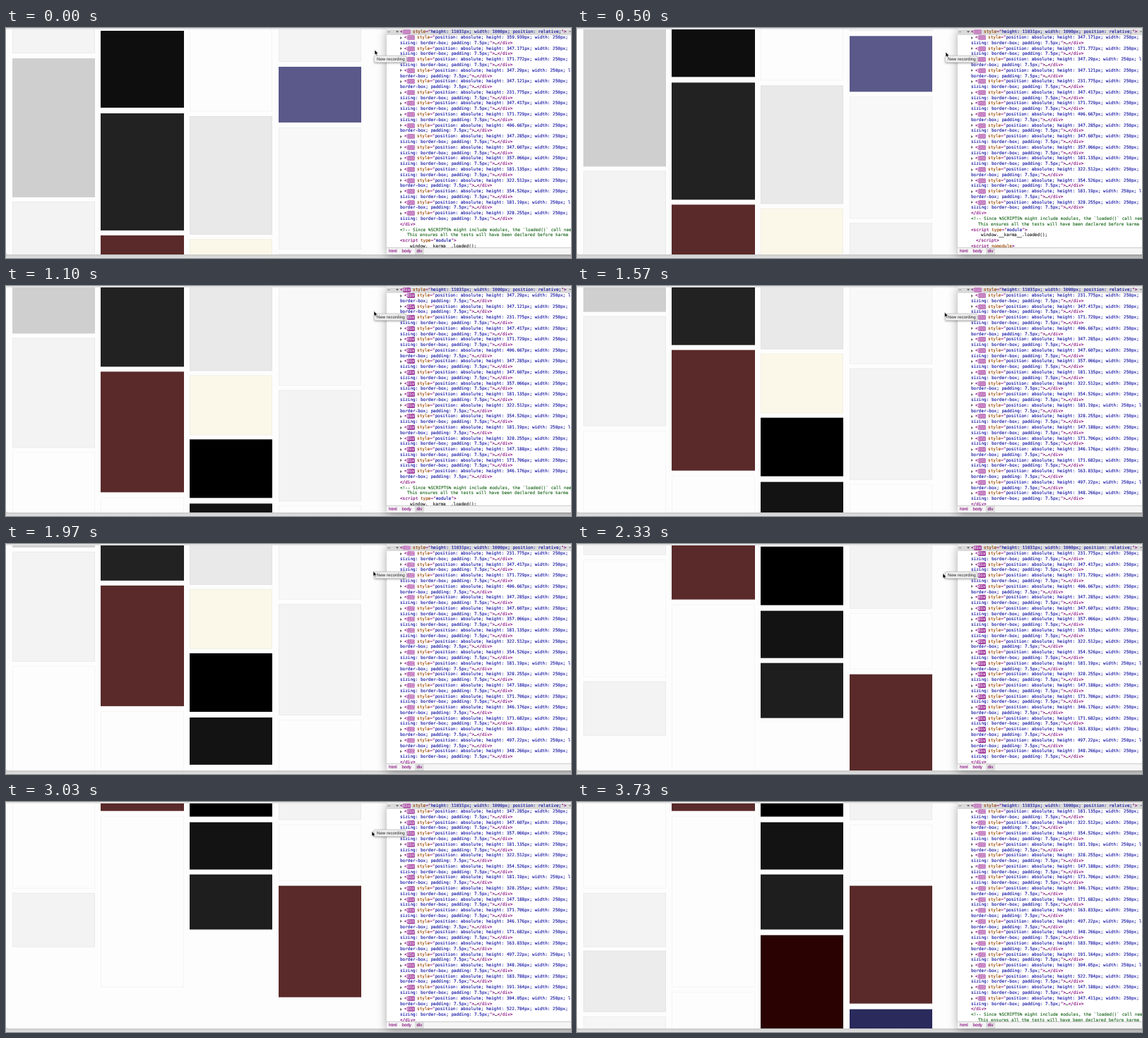
These frames come from a looping animation (800 px wide and 326 px high, 3.76 s). An HTML page:

```html
<!DOCTYPE html>
<html lang="en">
<head>
<meta charset="utf-8">
<title>Virtual masonry scroll</title>
<style>
  html, body { margin: 0; width: 100%; height: 100%; overflow: hidden; }
  body { position: relative; background: #dcdcdc; text-rendering: geometricPrecision; }
  #stage { position: absolute; left: 0; top: 0; width: 800px; height: 326px; overflow: hidden;
    background: linear-gradient(#dedede 0, #e6e6e6 2px, #e6e6e6 320px, #c9c9c9 321px, #e2e2e2 326px); }
  #page { position: absolute; left: 0; top: 2px; width: 800px; height: 319px; overflow: hidden;
    background: #fdfdfd; border-radius: 0 0 0 4px; }
  #wall { position: absolute; left: 0; top: -2px; }
  .card { position: absolute; width: 117.4px; box-sizing: border-box; }
  .pale { border: 1px solid rgba(0, 0, 0, .035); }

  #tools { position: absolute; left: 539px; top: 1px; width: 280px; height: 320px;
    background: #fff; box-shadow: 0 3px 14px rgba(0, 0, 0, .34); border-radius: 0 0 0 3px; }
  #tree { position: absolute; left: 0; top: 0; width: 261px; height: 310px; overflow: hidden;
    font: 6.02px/7.79px "DejaVu Sans Mono", monospace; color: #222; white-space: pre;
    -webkit-text-stroke: .14px; }
  #tree div { position: absolute; height: 7.79px; }
  #tree .head { left: 0; top: 1.2px; width: 261px; background: #dadada; }
  .head > span { position: absolute; top: 0; }
  .t { color: #881280; }
  .n { color: #994500; }
  .v { color: #1a1aa6; }
  .c { color: #236e25; }
  .g { color: #777; }
  b { font-weight: normal; background: var(--bg); color: var(--fg); border-radius: 1.5px; }
  .arrow { position: absolute; left: -5.6px; top: 1.7px; border: solid transparent;
    border-width: 2.2px 0 2.2px 3.8px; border-left-color: #6e6e6e; }
  .arrow.open { left: 13.2px; top: 2.2px; border-width: 3.8px 2.2px 0; border-color: #6e6e6e transparent; }
  #crumbs { position: absolute; left: 0; top: 310px; width: 261px; height: 10px; box-sizing: border-box;
    border-top: 1px solid #ccc; background: #f5f5f5; color: #881280;
    font: 6.2px/9px "Liberation Sans", Arial, sans-serif; border-radius: 0 0 0 3px;
    -webkit-text-stroke: .1px; }
  #crumbs span { position: absolute; top: 0; padding: 0 3px; }
  #crumbs .on { background: #dedede; }

  #tip { position: absolute; left: 521px; top: 38.5px; width: 46px; height: 10.5px; box-sizing: border-box;
    padding-left: 3px; background: #f0f0f0; border: .5px solid #d2d2d2; border-radius: 2px;
    box-shadow: 0 1px 3px rgba(0, 0, 0, .35); color: #222; white-space: nowrap;
    font: 6.15px/10px "Liberation Sans", Arial, sans-serif; }
  #mouse { position: absolute; left: 0; top: 0; width: 7px; height: 10px; overflow: visible; }
</style>
</head>
<body>
<div id="stage">
  <div id="page"><div id="wall"></div></div>
  <div id="tools">
    <div id="tree"></div>
    <div id="crumbs">
      <span style="left:0">html</span><span style="left:18.5px">body</span><span class="on" style="left:39.5px">div</span>
    </div>
  </div>
  <div id="tip">New recording</div>
  <svg id="mouse" viewBox="0 0 7 10">
    <path d="M0 0V7.2L1.7 5.7L2.8 8.3L4 7.8L2.9 5.3H5.1Z" fill="#000" stroke="#fff" stroke-width=".6"/>
  </svg>
</div>
<script>
const LOOP = 3760, LATE = 3400, LEAVE = 3060;
const $ = id => document.getElementById(id);

// Cards per column: top, height, colour, time of appearance
const columns = [
  [[-120, 156, '#f4f4f4'], [42.5, 197, '#cfcfcf'], [246, 156, '#f3f3f3'], [408, 167, '#fdfdfd'],
   [581.3, 76.4, '#f3f3f3'], [663.3, 87, '#ececec', LATE], [756, 150, '#f6f6f6', LATE]],
  [[4, 108.5, '#0e0e0e'], [120.5, 166.5, '#222'], [294.2, 170.4, '#5a2a2a'], [471.5, 243, '#fdfdfd'],
   [721, 150, '#fdfdfd', LATE]],
  [[-50, 168, '#fdfdfd'], [125, 167.5, '#e9e9e9'], [298.5, 85, '#fbf8ea'], [389.7, 83.8, '#000'],
   [480.6, 67, '#131313'], [554.8, 78.6, '#1e1e1e', 2000], [640.5, 170, '#2a0202', LATE]],
  [[-120, 167.5, '#f4f4f4'], [55, 78.7, '#5a598a'], [140.5, 173.5, '#f8f8f8'], [319.5, 158.5, '#f3f3f3'],
   [484.3, 79.5, '#fdfdfd'], [571, 167, '#5a2a2a'], [745.5, 150, '#2a2a5c', LATE]]
];

const heights = [359.939, 347.171, 171.772, 347.29, 347.121, 231.775, 347.417, 171.729, 406.667, 347.285,
  347.607, 357.066, 181.135, 322.512, 354.526, 181.19, 328.255, 147.188, 171.706, 346.176,
  171.682, 163.833, 497.22, 348.266, 183.788, 191.164, 304.05, 522.784, 147.188, 347.411];
// Items in the first column have a shorter "left", so their style wraps later
const firstColumn = [4, 8, 13, 19, 21, 24];

// Tree updates: time, first and last item mounted
const updates = [[-220, 0, 16], [280, 1, 16], [720, 1, 16], [1070, 3, 19], [1380, 5, 23], [1630, 5, 23],
  [2310, 5, 23], [2600, 9, 27], [2940, 9, 27], [3450, 12, 29]];

// Scroll: time, offset, speed
const scroll = [[0, 0, .06], [500, 43.5, .13], [1100, 172.5, .11], [1970, 235, .13], [2330, 386, .33], [2660, 452.3, 0]];
const mouse = [[0, 522, 31], [500, 522, 34], [1100, 521, 35.5], [1970, 520, 38.5], [2330, 518, 41.5],
  [LEAVE, 518, 41.5], [LEAVE + 130, 128, -12]];

const timed = [];
let tallRed;
columns.forEach((cards, i) => cards.forEach(([top, height, colour, from]) => {
  const el = document.createElement('div');
  const pale = colour > '#e';
  el.className = pale ? 'card pale' : 'card';
  el.style.cssText = `left:${8.6 + i * 125.65}px;top:${top}px;height:${height}px;background:${colour}`;
  $('wall').append(el);
  if (from) timed.push([el, from]);
  if (top === 571) tallRed = el;
}));

const span = (cls, text) => `<span class="${cls}">${text}</span>`;
const attr = value => span('n', ' style') + span('t', '="') + span('v', value);
const tag = text => span('t', text.replace('<', '&lt;'));
const open = span('t', '&lt;<b>div</b>');
const script = type => tag('<script') + span('n', ' type') + span('t', '="') + span('v', type) + span('t', '">');

function drawTree(first, last) {
  let row = 0, html = '';
  const line = (x, content) => {
    row++;
    html += `<div style="left:${x - 539}px;top:${1.2 + row * 7.79}px">${content}</div>`;
  };
  html += '<div class="head"><span class="g" style="left:1.5px;top:-1px">…</span><i class="arrow open"></i>' +
    `<span style="left:19px">${open}${attr('height: 11031px; width: 1000px; position: relative;')}` +
    `${tag('">')} <i class="g">== $0</i></span></div>`;
  for (let i = first; i <= last; i++) {
    const h = String(heights[i]);
    const fits = h.length < 7 || firstColumn.includes(i);
    line(564, '<i class="arrow"></i>' + open +
      attr(`position: absolute; height: ${h}px; width: 250px; left: 250px;`));
    line(558, span('v', (fits ? '' : 'sizing: ') + 'border-box; padding: 7.5px;') +
      tag('">') + '…' + tag('</div>'));
  }
  line(558, tag('</div>'));
  line(558, span('c', '&lt;!-- Since %SCRIPTS% might include modules, the `loaded()` call needs'));
  line(568, span('c', 'This ensures all the tests will have been declared before karma starts'));
  line(558, script('module'));
  line(572, 'window.__karma__.loaded();');
  line(565, tag('<' + '/script>'));
  line(558, tag('<script') + span('n', ' nomodule') + tag('>'));
  $('tree').innerHTML = html;
}

// cubic-bezier(0, 0, .2, 1)
function easeOut(x) {
  let lo = 0, hi = 1;
  for (let i = 0; i < 20; i++) {
    const s = (lo + hi) / 2;
    if (.6 * s * s + .4 * s * s * s < x) lo = s; else hi = s;
  }
  return lo * lo * (3 - 2 * lo);
}

const mix = (a, b, p) => `rgb(${a.map((v, i) => Math.round(v + (b[i] - v) * p))})`;

function segment(keys, t) {
  let i = keys.length - 2;
  while (i > 0 && keys[i][0] > t) i--;
  const a = keys[i], b = keys[i + 1], d = b[0] - a[0];
  return [a, b, Math.min(1, (t - a[0]) / d), d];
}

function scrollAt(t) {
  const [a, b, u, d] = segment(scroll, t), v = 1 - u;
  return a[1] * v * v * (1 + 2 * u) + b[1] * u * u * (3 - 2 * u) + d * u * v * (a[2] * v - b[2] * u);
}

let shown = '';
function render(t) {
  $('wall').style.transform = `translateY(${-scrollAt(t).toFixed(2)}px)`;
  for (const [el, from] of timed) el.style.visibility = t < from ? 'hidden' : 'visible';
  tallRed.style.height = (t > 2660 && t < LATE ? 158 : 167) + 'px';

  const [a, b, u] = segment(mouse, t);
  $('mouse').style.transform = `translate(${a[1] + (b[1] - a[1]) * u}px, ${a[2] + (b[2] - a[2]) * u}px)`;
  $('tip').style.visibility = t < LEAVE ? 'visible' : 'hidden';

  const [start, first, last] = updates.filter(k => k[0] <= t).pop();
  if (shown !== first + '-' + last) {
    shown = first + '-' + last;
    drawTree(first, last);
  }
  const p = easeOut(Math.min(1, (t - start) / 1120));
  $('tree').style.setProperty('--bg', mix([158, 54, 153], [245, 219, 244], p));
  $('tree').style.setProperty('--fg', mix([255, 255, 255], [136, 18, 128], p));
}

const begin = performance.now();
function tick() {
  render((performance.now() - begin) % LOOP);
  requestAnimationFrame(tick);
}
tick();
</script>
</body>
</html>
```
